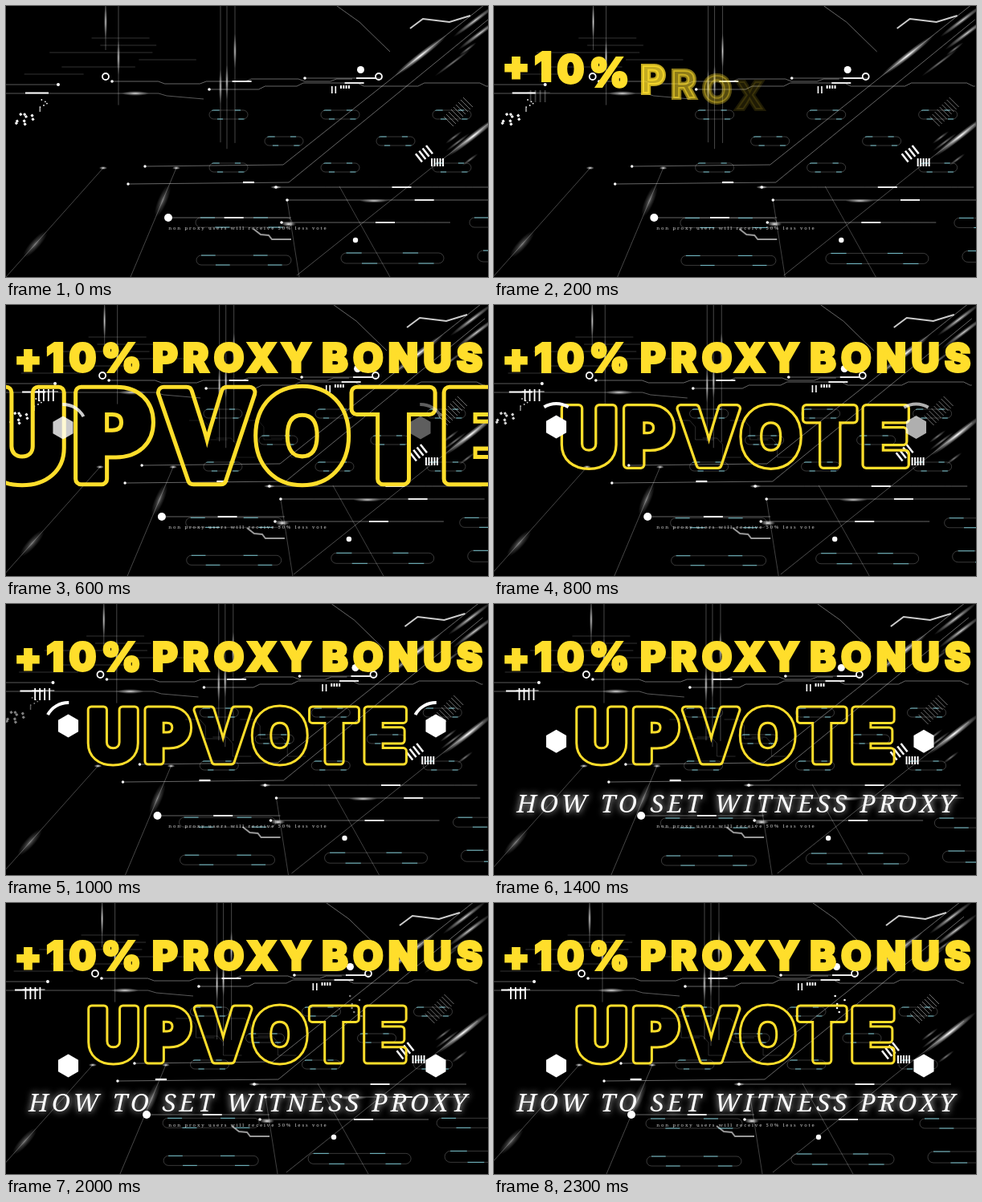
Recreate the animation shown at these times as an HTML page with a canvas. Size 600 by 338 pixels, loop 2400 ms.

```html
<!DOCTYPE html>
<html lang="en">
<head>
<meta charset="utf-8">
<style>
html, body { margin: 0; width: 100%; height: 100%; overflow: hidden; background: #000; }
canvas { display: block; }
</style>
</head>
<body>
<canvas id="stage" width="600" height="338"></canvas>
<script>
const W = 600, H = 338, LOOP = 2400, STEP = 100;
const YELLOW = '#ffde2b', TEAL = '#7fd4e0';
const stage = document.getElementById('stage');
const c = stage.getContext('2d');
const ink = Object.assign(document.createElement('canvas'), { width: W, height: H }).getContext('2d');

const clamp = v => Math.max(0, Math.min(1, v));
const ramp = (t, a, b) => clamp((t - a) / (b - a));
const smooth = p => p * p * (3 - 2 * p);
const white = a => `rgba(255,255,255,${a})`;
const times = (n, draw) => { for (let i = 0; i < n; i++) draw(i); };

let seed;
function rnd(a = 0, b = 1) {
  seed = seed * 16807 % 2147483647;
  return a + (b - a) * seed / 2147483647;
}

function line(alpha, width, ...p) {
  c.beginPath();
  for (let i = 0; i < p.length; i += 2) c.lineTo(p[i], p[i + 1]);
  c.strokeStyle = white(alpha);
  c.lineWidth = width;
  c.stroke();
}

function dot(x, y, r) {
  c.fillStyle = '#fff';
  c.beginPath();
  c.arc(x, y, r, 0, 7);
  c.fill();
}

function glow(x, y, rx, ry, deg, alpha) {
  c.save();
  c.translate(x, y);
  c.rotate(deg * Math.PI / 180);
  c.scale(rx, ry);
  const g = c.createRadialGradient(0, 0, 0, 0, 0, 1);
  g.addColorStop(0, white(alpha));
  g.addColorStop(.4, white(alpha * .5));
  g.addColorStop(1, white(0));
  c.fillStyle = g;
  c.fillRect(-1, -1, 2, 2);
  c.restore();
}

// Dim capsule with a few teal dashes
function pill(x, y, w, h) {
  c.beginPath();
  c.roundRect(x, y, w, h, h / 2);
  c.lineWidth = .9;
  c.strokeStyle = white(.25);
  c.stroke();
  c.setLineDash([w * .15, w * .4]);
  c.strokeStyle = TEAL;
  c.stroke();
  c.setLineDash([]);
}

// Horizontal track with random jogs, an end dot and one bright stretch
function track(x, end, y, jog = 0) {
  dot(x, y, 1.8);
  const p = [x, y];
  while (x < end) {
    x = Math.min(end, x + rnd(25, 70));
    p.push(x, y);
    if (rnd() < .5) p.push(x += 8, y += rnd() < .5 ? jog : -jog);
  }
  line(.4, 1, ...p);
  const at = 2 * Math.floor(p.length / 4);
  line(1, 1.8, p[at] - 24, p[at - 1], p[at], p[at - 1]);
}

function bars(x, y, w, h, n, gap, deg = 0) {
  c.save();
  c.translate(x, y);
  c.rotate(deg * Math.PI / 180);
  c.fillStyle = '#fff';
  times(n, i => c.fillRect(i * gap, 0, w, h));
  c.restore();
}

function shifted(dx, dy, draw) {
  c.save();
  c.translate(dx, dy);
  draw();
  c.restore();
}

function strands() {
  for (const x of [124, 140, 267, 275, 285]) {
    const len = x % 2 ? rnd(90, 185) : rnd(55, 125);
    line(.28, 1, x, 0, x, len);
    glow(x, rnd(.2, .6) * len, 2, 22, 0, .75);
  }
}

function circuits(t) {
  line(.35, 1, 0, 98, 65, 98);
  dot(65, 98, 2);
  line(.35, 1, 0, 109, 190, 109, 200, 112, 246, 116);
  line(1, 2, 24, 108.5, 53, 108.5);
  glow(161, 109, 17, 3, 0, .8);
  track(132, 431, 94, 3);
  track(253, W, 104, 4);
  track(372, 460, 90);
  dot(441.5, 79.5, 4.5);
  for (const x of [124, 464]) {
    c.beginPath();
    c.arc(x, 88, 4, 0, 7);
    c.stroke();
  }
  times(6, i => line(.2, 1, rnd(0, 200), 40 + i * 9, rnd(0, 250), 40 + i * 9));
  line(.4, 1, 412, 0, 440, 20, 478, 57);
  line(.8, 2, 503, 28, 519, 16, 552, 20, 578, 12);

  // Tracks that bend up to the right, with streaks along the slope
  times(2, i => {
    const x = 173 - 21 * i, y = 200 + 22 * i;
    line(.4, 1, x, y, x + 172 + 28 * i, y - 2, W, y - 205);
    dot(x, y, 1.7);
    glow(516 + 66 * i, 62 + 100 * i, 42, 4, -38, 1);
    glow(590 - 6 * i, 34 - 16 * i, 34, 3, -37, .8);
  });
  line(.3, 1, 362, 336, 527, 204, W, 147);
  times(5, i => glow(rnd(520, W), rnd(20, 220), rnd(12, 30), 2, -37, .5));
  const run = 295 - t * .048;
  line(1, 2.2, run, 220, run + 14, 220);

  // Floor tracks
  times(2, i => {
    const x = 121 + 91 * i, foot = 155 * i, at = .7 - .4 * i;
    line(.28, 1, x, 202, foot, H);
    glow(x, 202, 5, 2, 0, 1);
    glow(x + (foot - x) * at, 202 + 136 * at, 22, 6, -48 - 19 * i, .4);
  });
}

function panels(t) {
  times(3, r => {
    for (let x = 253 + r % 2 * 69; x < 560; x += 139) pill(x, 130 + 33 * r, 48, 11);
  });
  const late = ramp(t, 200, 800) * .17;
  times(4, i => {
    const x = 235 + i * 34, y = 144 + i % 2 * 22;
    line(late, 1, x, y, x + 18, y, x + 25, y + 8, x + 25, y + 24, x + 48, y + 24);
  });
  bars(405, 100, 1.6, 9, 2, 4.5);
  bars(416, 99, 2, 4, 4, 3.3);
  bars(529, 190, 2, 10, 5, 3.5);
  bars(509, 185, 2.5, 13, 4, 5.5, -38);
  times(9, i => line(.45, 1, 545 + i * 3, 138 - i * 3, 557 + i * 3, 150 - i * 3));

  // Squares on the left give way to bars
  c.globalAlpha = 1 - ramp(t, 700, 1300);
  times(9, () => bars(rnd(6, 32), rnd(134, 150), 3, 3, 1, 0, -35));
  times(7, i => dot(rnd(42, 52), 117 + i * 2.3, .9));
  c.globalAlpha = ramp(t, 100, 500);
  bars(47, 105, 1.8, 15, 4, 6);
  line(.9, 1, 44, 108, 72, 108);
  c.globalAlpha = ramp(t, 1800, 2200);
  times(6, i => dot(rnd(448, 468), 116 + i * 5, 1.3));
  c.globalAlpha = 1;
}

function lowTracks() {
  track(202, 355, 264);
  dot(202, 264, 5);
  track(343, 545, 270);
  track(350, W, 242);
  track(336, W, 226);
  glow(336, 226, 7, 2, 0, 1);
  glow(352, 272, 9, 3, 0, 1);
  glow(458, 243, 18, 2.5, 0, .8);
  dot(435, 292, 3.2);
  line(.6, 2, 308, 278, 317, 285, 327, 286, 331, 291, 355, 291);
  times(2, i => line(.25, 1, 350 + 65 * i, 242 - 17 * i, 365 + 113 * i, H));
}

function ground() {
  times(3, i => pill(237 + 180 * i - 10 * (i > 1), 311 - 3 * i, 118 + 10 * i, 12 + i));
  times(2, i => pill(236 + 341 * i, 264, 120, 12));
}

function background(t) {
  const k = t / 2300;
  seed = 41;
  shifted(-5 * k, 0, strands);
  shifted(-15 * k, 0, () => circuits(t));
  shifted(-27 * k, 0, () => panels(t));
  shifted(-31 * k, 0, lowTracks);
  shifted(-47 * k, 5 * k, ground);
}

// Calls draw(letter, x, index) for each letter of a centred text
function letters(text, cx, gap, draw, spaceGap = 0) {
  c.letterSpacing = gap + 'px';
  c.wordSpacing = spaceGap + 'px';
  const wide = s => c.measureText(s).width;
  const left = cx - (wide(text) - gap) / 2;
  [...text].forEach((ch, i) => draw(ch, left + wide(text.slice(0, i + 1)) - wide(ch), i));
  c.letterSpacing = c.wordSpacing = '0px';
}

function headline(t) {
  c.font = '800 48px Inter, sans-serif';
  c.fillStyle = c.strokeStyle = YELLOW;
  c.lineWidth = 4;
  c.lineJoin = 'miter';
  c.miterLimit = 3;
  letters('+10% PROXY BONUS', 302, 6.8, (ch, x, i) => {
    const p = ramp(t - i * 14, 80, 340), y = 83 + 50 * (1 - p) ** 3;
    c.globalAlpha = clamp(p * 4);
    c.fillText(ch, x, y);
    c.strokeText(ch, x, y);
  }, -10);
  c.globalAlpha = 1;
}

// Outline of a letter thickened by `heavy`, drawn alone so neighbours may overlap
function outline(ch, x, y, scale, font, heavy, width) {
  ink.resetTransform();
  ink.clearRect(0, 0, W, H);
  ink.setTransform(scale, 0, 0, scale, 300, 164.5);
  ink.font = font;
  ink.lineJoin = 'round';
  ink.fillStyle = ink.strokeStyle = YELLOW;
  for (const [mode, side] of [['source-over', 1], ['destination-out', -1]]) {
    ink.globalCompositeOperation = mode;
    ink.lineWidth = 2 * heavy + side * width;
    ink.fillText(ch, x, y);
    ink.strokeText(ch, x, y);
  }
  ink.globalCompositeOperation = 'source-over';
  c.drawImage(ink.canvas, 0, 0);
}

function title(t) {
  const scale = 1 + (Math.max(0, 1109 - t) / 560) ** 4;
  c.globalAlpha = ramp(t, 200, 400);
  c.font = '800 88px Inter, sans-serif';
  letters('UPVOTE', 0, 6.6, (ch, x) => outline(ch, x, 31.5, scale, c.font, 4, 3));
  c.globalAlpha = 1;
}

// Linear path through [time, x, y, alpha] stops
function along(stops, t) {
  let i = 0;
  while (i < stops.length - 2 && t > stops[i + 1][0]) i++;
  const [a, b] = [stops[i], stops[i + 1]], p = ramp(t, a[0], b[0]);
  return a.map((v, j) => v + (b[j] - v) * p).slice(1);
}

function hexagon(t, stops) {
  const [x, top, alpha] = along(stops, t);
  const y = top + 51 * smooth(ramp(t, 1200, 1680));
  c.globalAlpha = alpha;
  c.fillStyle = c.strokeStyle = '#fff';
  c.beginPath();
  times(6, i => {
    const a = Math.PI * (i / 3 + .5);
    c.lineTo(x + 14.5 * Math.cos(a), y + 14.5 * Math.sin(a));
  });
  c.fill();
  const swing = (-60 - (t - 600) * .15) * Math.PI / 180;
  c.globalAlpha *= ramp(t, 400, 600) * (1 - ramp(t, 1100, 1300));
  c.beginPath();
  c.arc(x, y, 29, swing - .55, swing + .55);
  c.lineWidth = 4;
  c.stroke();
  c.globalAlpha = 1;
}

function captions(t) {
  c.font = '6px "Noto Serif", serif';
  c.fillStyle = white(.8);
  letters('non proxy users will receive 50% less vote', 300.5, 1.85,
    (ch, x) => c.fillText(ch, x, 279));

  c.save();
  c.globalAlpha = ramp(t, 1100, 1400);
  c.font = 'italic 500 31px "Noto Serif", serif';
  c.fillStyle = '#fff';
  c.shadowColor = white(.9);
  c.shadowBlur = 9;
  letters('HOW TO SET WITNESS PROXY', 301, 4.2, (ch, x) => c.fillText(ch, x, 260));
  c.restore();
}

function frame(now) {
  const t = Math.floor(now % LOOP / STEP) * STEP;
  c.fillStyle = '#000';
  c.fillRect(0, 0, W, H);
  background(t);
  headline(t);
  title(t);
  hexagon(t, [[200, 43, 167, 0], [400, 57, 160, .2], [600, 71, 153, .8], [800, 77.5, 152, 1]]);
  hexagon(t, [[300, 598, -50, 0], [400, 571, 18, .2], [600, 516, 153, .37], [1000, 535, 152, 1]]);
  captions(t);
  requestAnimationFrame(() => frame(performance.now() - begin));
}

const begin = performance.now();
frame(0);
</script>
</body>
</html>
```
